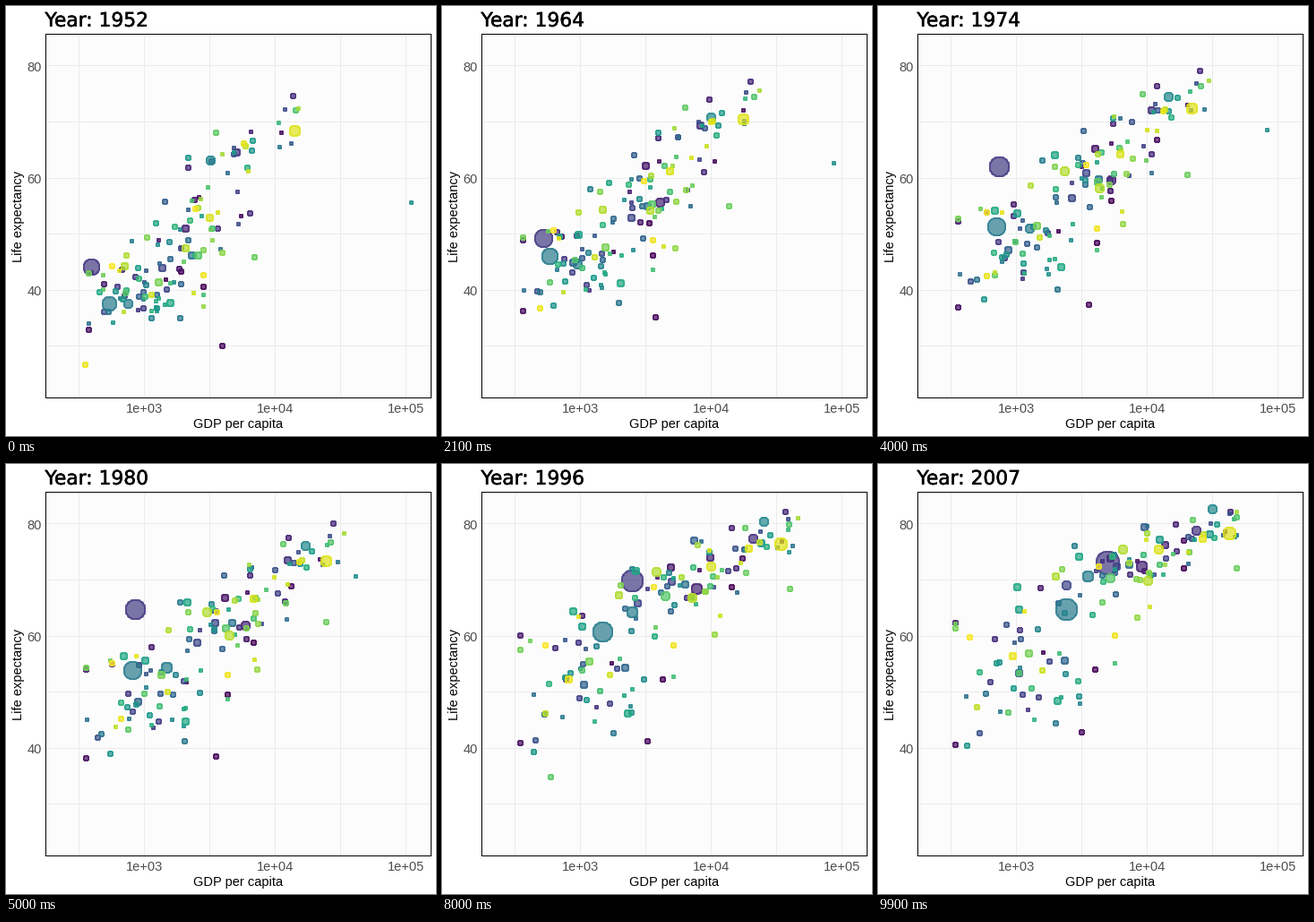
A matplotlib script for the animation above (10 s loop, 480x480 px).

```python
import numpy as np
import matplotlib.pyplot as plt
from matplotlib import patheffects
from matplotlib.animation import FuncAnimation

SIZE, DPI, FRAMES, N = 480, 72, 100, 142
LEFT, RIGHT, TOP, BOTTOM = 44, 474, 31, 437
MAX_POP = 1319
t = np.linspace(0, 1, FRAMES)
years = 1952 + 55 * t
knots = np.arange(1952, 2008, 5)
rng = np.random.default_rng(7)

# Eased dots: rank, population (millions), log income, life expectancy,
# each as (start, end[, easing power])
EASED = [
    (58, (372, 1110), (2.74, 3.39, 1.9), (37.4, 64.7, 0.75)),
    (134, (157, 301), (4.15, 4.63, 1.0), (68.4, 78.2, 1.0)),
    (66, (86, 127), (3.51, 4.50, 0.45), (63.0, 82.6, 0.6)),
    (59, (82, 223), (2.88, 3.55, 1.2), (37.5, 70.6, 1.0)),
    (14, (57, 190), (3.32, 3.96, 0.5), (50.9, 72.4, 1.0)),
    (3, (4, 12), (3.60, 3.50, 1.0), (30.0, 42.7, 0.6)),
]

# Dots that turn: rank, population, (year, log income, life) key points
TURNING = [
    (24, (556, 1319), (1952, 2.60, 44), (1957, 2.76, 50.5), (1962, 2.69, 44.5),
     (1967, 2.79, 58.4), (1980, 2.94, 64.8), (2007, 3.70, 73)),
    (70, (0.2, 2.5), (1952, 5.04, 55.6), (1967, 4.91, 64.6), (1972, 5.04, 67.7),
     (1982, 4.50, 71.3), (2007, 4.67, 77.6)),
    (105, (2.5, 9), (1952, 2.69, 40), (1987, 2.93, 44), (1992, 2.87, 23.6),
     (1997, 2.77, 36.1), (2007, 2.94, 46.2)),
]

# Crowd: count, correlation, then (start, end) of the mean and spread
# of log income and of life expectancy
REGIONS = [
    (49, 0.25, (3.02, 3.15), (0.23, 0.32), (39.5, 54.5), (3.8, 7.0)),
    (28, 0.50, (3.47, 3.90), (0.20, 0.22), (53.0, 73.3), (7.5, 3.4)),
    (28, 0.55, (3.20, 3.85), (0.34, 0.46), (45.0, 70.8), (7.0, 5.5)),
    (28, 0.70, (3.76, 4.42), (0.22, 0.17), (65.8, 78.2), (4.0, 2.2)),
]


def ease(start, end, power=0.7):
    return start + (end - start) * t ** power


def px(log_income):
    return 153.9 + 146.2 * (log_income - 3)


def py(life):
    return 66.5 + 6.255 * (80 - life)


def drift():
    """A persistent offset that wanders a little every five years."""
    walk = rng.normal() + np.cumsum(rng.normal(0, 0.12, len(knots)))
    return np.interp(years, knots, np.clip(walk, -1.9, 1.9))


income, life, pop = np.zeros((3, N, FRAMES))

for i, people, money, age in EASED:
    income[i], life[i], pop[i] = ease(*money), ease(*age), ease(*people, 1)
for i, people, *points in TURNING:
    when, money, age = zip(*points)
    income[i] = np.interp(years, when, money)
    life[i] = np.interp(years, when, age)
    pop[i] = ease(*people, 1)

taken = [row[0] for row in EASED + TURNING]
free = iter(rng.permutation(np.setdiff1d(np.arange(N), taken)))
for count, corr, gm, gs, lm, ls in REGIONS:
    for i, _ in zip(free, range(count)):
        a, b = drift(), drift()
        mix = corr * a + np.sqrt(1 - corr ** 2) * b
        income[i] = np.minimum(ease(*gm) + ease(*gs) * a, 4.69)
        life[i] = np.minimum(ease(*lm) + ease(*ls) * mix, 82)
        start = np.clip(4 * np.exp(rng.normal(0, 1.2)), 0.1, 50)
        pop[i] = ease(start, start * rng.uniform(1.3, 3), 1)

# Dots sit on whole pixels and have whole radii
x = np.floor(px(income)) + 0.5
y = np.floor(py(life)) + 0.5
scale = 2 + 10 * np.sqrt(pop / MAX_POP)
area = (2 * np.floor(0.375 * (2.845 * scale + 0.945))) ** 2

plt.rcParams["font.family"] = "Liberation Sans"
fig = plt.figure(figsize=(SIZE / DPI, SIZE / DPI), dpi=DPI, facecolor="white")
ax = fig.add_axes([LEFT / SIZE, 1 - BOTTOM / SIZE,
                   (RIGHT - LEFT) / SIZE, (BOTTOM - TOP) / SIZE],
                  facecolor="#fcfcfc")
ax.set(xlim=(LEFT, RIGHT), ylim=(BOTTOM, TOP), xticks=[], yticks=[])
for v in np.arange(2.5, 5.1, 0.5):
    ax.axvline(px(v), color="#ebebeb", lw=1, zorder=0)
for v in range(30, 81, 10):
    ax.axhline(py(v), color="#ebebeb", lw=1, zorder=0)
for side in ax.spines.values():
    side.set(color="black", linewidth=1)


def label(x, y, text, **style):
    style = {"fontsize": 14.67, "va": "baseline", "ha": "center", **style}
    return fig.text(x / SIZE, 1 - y / SIZE, text, **style)


for v in (3, 4, 5):
    label(px(v) + 0.3, 454.5, f"1e+0{v}", color="#4d4d4d")
for v in (40, 60, 80):
    label(39.5, py(v) + 6.5, str(v), color="#4d4d4d", ha="right")
label(259.5, 471.5, "GDP per capita")
label(18, 234.5, "Life expectancy", rotation=90, rotation_mode="anchor")
title = label(43.5, 22.8, "", fontsize=21.8, family="DejaVu Sans", ha="left")
title.set_path_effects([patheffects.withStroke(linewidth=0.5, foreground="black")])

colors = plt.get_cmap("viridis")(np.arange(N) / (N - 1))
colors[:, 3] = 0.7
dots = ax.scatter(x[:, 0], y[:, 0], s=area[:, 0], facecolors=colors,
                  edgecolors=colors, linewidths=1, antialiased=False, zorder=2)


def draw(f):
    dots.set_offsets(np.column_stack((x[:, f], y[:, f])))
    dots.set_sizes(area[:, f])
    title.set_text(f"Year: {round(years[f])}")
    return dots, title


anim = FuncAnimation(fig, draw, frames=FRAMES, interval=100,
                     repeat=True, repeat_delay=0, blit=False)
plt.show()
```
